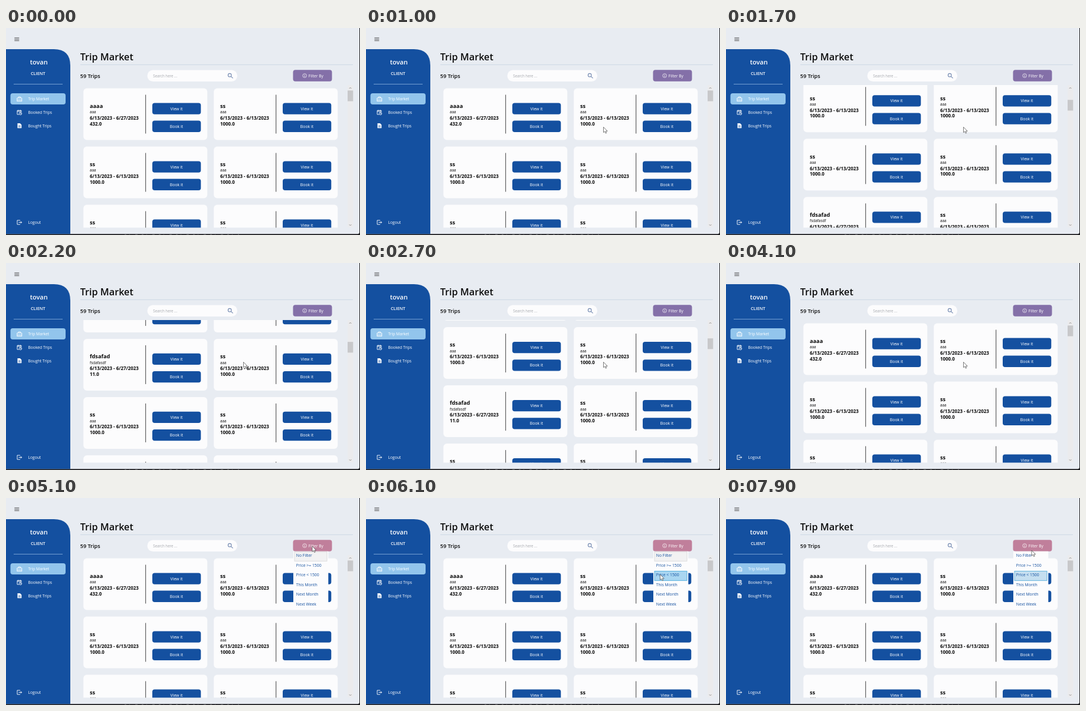
An HTML page for the animation above (8 s loop, 600 px wide and 352 px high).

```html
<!DOCTYPE html>
<html lang="en">
<head>
<meta charset="utf-8">
<title>Trip Market</title>
<style>
  html, body { margin: 0; width: 100%; height: 100%; overflow: hidden; background: #e8ecf2; }
  svg { display: block; width: 600px; height: 352px; }
  text { font: 6.7px "Open Sans", "Noto Sans", sans-serif; fill: #fff; }
  .mid { text-anchor: middle; }
  .dark text, text.dark { fill: #0a0a0a; }
  .line { fill: none; stroke: #fff; stroke-width: .9; }
  .white { fill: #fcfcfd; }
  .blue { fill: #1450a0; }
</style>
</head>
<body>
<svg viewBox="0 0 600 352">
  <defs><clipPath id="view"><rect x="120" y="97" width="450" height="242.5"/></clipPath></defs>
  <rect width="600" height="352" fill="#1d1d20"/>
  <path d="M0 0H599V347Q599 350.3 596 350.3H0Z" fill="#e8ecf2"/>
  <path d="M201 351.3H395" stroke="#77777c" stroke-width=".8" stroke-dasharray="3 5 1 9 4 7"/>
  <path d="M14.3 16.8H22.3M14.3 19.2H22.3M14.3 21.6H22.3" stroke="#444" stroke-width=".9"/>

  <g id="sidebar">
    <path class="blue" d="M0 36H81Q109 36 109 64V350.3H0Z"/>
    <text class="mid" x="55.7" y="62" style="font-size:11px;font-weight:600">tovan</text>
    <text class="mid" x="54.3" y="79.6" style="font-size:7.3px;font-weight:600">CLIENT</text>
    <path d="M13 95.5H96" stroke="#7fa9d9" stroke-width=".9"/>
    <rect x="7.5" y="111" width="93.5" height="19" rx="4" fill="#92c5ec"/>
    <text x="37.5" y="123.4">Trip Market</text>
    <text x="37.5" y="146">Booked Trips</text>
    <text x="37.5" y="168.6">Bought Trips</text>
    <text x="37.5" y="332.6">Logout</text>
    <g class="line">
      <path d="M18.8 119H26.8V124.6H18.8ZM21 119V117.2H24.6V119M18.8 122.4H26.8"/>
      <path d="M22 147H19V140.3H26V142.5M19 142H26M20.8 139.3V141M24.2 139.3V141"/>
      <circle cx="24.5" cy="145.5" r="2.2"/>
      <path d="M24.5 144.2V145.6H25.6"/>
      <path d="M24 327H19V334H24M21.5 330.5H26.5M24.8 328.6L26.7 330.5L24.8 332.4"/>
    </g>
    <path d="M19.5 162H23.7L26.3 164.6V170.3H19.5Z" fill="#fff"/>
    <path d="M21 166.3H24.8M21 168.2H24.8" stroke="#1450a0" stroke-width=".8"/>
  </g>

  <text class="dark" x="125.7" y="55" style="font-size:16.2px;font-weight:600">Trip Market</text>
  <path d="M126 62.4H588" stroke="#cbd6e5" stroke-width=".9"/>
  <text class="dark" x="125.7" y="85.2" style="font-size:9.1px;font-weight:600">59 Trips</text>
  <rect class="white" x="239.5" y="71.5" width="152.5" height="19.5" rx="9.75"/>
  <text x="249.3" y="83.8" style="font-size:6.2px;fill:#a5a8ad">Search here ...</text>
  <g class="line" style="stroke:#7288b0;stroke-width:1.1">
    <circle cx="379.2" cy="80.2" r="2.8"/><path d="M381.3 82.3L384.6 85.4"/>
  </g>
  <rect id="filter" x="486.5" y="71.3" width="66" height="19.4" rx="4"/>
  <circle class="line" cx="506.2" cy="81" r="3.3" style="stroke-width:.7"/>
  <path class="line" d="M506.2 80.5V83M506.2 78.9V79.7" style="stroke-width:.8"/>
  <text x="512.8" y="83.5">Filter By</text>

  <g clip-path="url(#view)"><g id="cards" class="dark"></g></g>

  <rect x="579" y="97" width="9.3" height="242" fill="#ebebed"/>
  <path class="line" d="M581.8 103L583.6 101.2L585.4 103M581.8 334.2L583.6 336L585.4 334.2" style="stroke:#8a8580"/>
  <rect id="thumb" x="579" width="9.3" height="18.2" fill="#c8c8ca"/>

  <g id="menu"><rect class="white" x="487" y="90.7" width="59.3" height="97.5"/></g>
  <path id="cursor" d="M0 0V9.2L2.2 7.3L3.7 10.6L5.2 9.9L3.8 6.8H6.7Z" fill="#fff" stroke="#444" stroke-width=".7"/>
</svg>
<script>
const LOOP = 8000, FRAME = 100;
const ROW_PITCH = 99, ROWS = 30, WHEEL_STEP = 26.4, TRACK = 224;
const MENU_TOP = 90.5, ITEM_HEIGHT = 16.5;
const MENU_OPENS = 5000, ITEM_CLICKED = 6300;

// [time, wheel notches] and [time, x, y]
const scrollKeys = [[1050, 0], [1700, 8], [2200, 14], [2450, 14], [2700, 11], [3200, 5], [3600, 0]];
const cursorKeys = [[200, 473, 93], [400, 467, 111], [500, 467, 111], [1000, 402.5, 168.5],
  [4100, 402.5, 168.5], [4900, 519, 82], [5200, 519, 82], [6000, 498.5, 130],
  [6700, 498.5, 130], [7900, 518, 89]];

const $ = id => document.getElementById(id);

function button(x, y, label) {
  return `<rect class="blue" x="${x}" y="${y}" width="82.3" height="19.3" rx="4"/>
    <text class="mid" x="${x + 41}" y="${y + 12.2}" style="font-size:6.9px;fill:#fff">${label}</text>`;
}

function card(x, y, [name, note, end, price]) {
  const line = (dy, size, weight, text) =>
    `<text x="10.8" y="${dy}" style="font-size:${size}px;font-weight:${weight}">${text}</text>`;
  return `<g transform="translate(${x} ${y})">
    <rect class="white" width="210" height="88" rx="6"/>
    ${line(33.4, 9.2, 700, name)}
    ${line(42.9, 6.4, 400, note)}
    ${line(53.3, 7.9, 700, `6/13/2023 - ${end}`)}
    ${line(63.2, 7.9, 700, price)}
    <path d="M105.5 11V77" stroke="#2a2a2a" stroke-width=".9"/>
    ${button(116.8, 24.9, "View it")}${button(116.8, 55.1, "Book it")}
  </g>`;
}

const usualTrip = ["ss", "aaa", "6/13/2023", "1000.0"];
const specialTrips = {
  0: ["aaaa", "aaa", "6/27/2023", "432.0"],
  8: ["fdsafad", "fsdafasdf", "6/27/2023", "11.0"]
};
$("cards").innerHTML = Array.from({ length: 20 }, (_, i) =>
  card(131.2 + i % 2 * 221, 102.5 + (i >> 1) * ROW_PITCH, specialTrips[i] || usualTrip)).join("");

const itemNames = ["No Filter", "Price &gt;= 1500", "Price &lt; 1500", "This Month", "Next Month", "Next Week"];
$("menu").innerHTML += itemNames.map((name, i) => {
  const y = MENU_TOP + i * ITEM_HEIGHT;
  return `<rect class="item" x="489" y="${y + .8}" width="55" height="16" stroke-width=".8"/>
    <text x="491.8" y="${y + 9.8}" style="font-size:6.85px;fill:#1450a0">${name}</text>`;
}).join("");
const items = [...document.querySelectorAll(".item")];

function valuesAt(keys, t) {
  const next = keys.findIndex(key => key[0] > t);
  if (next === 0) return keys[0].slice(1);
  if (next < 0) return keys[keys.length - 1].slice(1);
  const a = keys[next - 1], b = keys[next];
  const p = (t - a[0]) / (b[0] - a[0]);
  return a.slice(1).map((v, i) => v + (b[i + 1] - v) * p);
}

function itemColors(index, hovered, selected, active) {
  if (index === hovered) return ["#a9d6f1", "#3aa3da"];
  if (index === selected) return active ? ["#c5dff0", "#45a5d8"] : ["#f2f2f3", "#d6d6d8"];
  return ["none", "none"];
}

function draw(t) {
  const scroll = Math.round(valuesAt(scrollKeys, t)[0]) * WHEEL_STEP;
  $("cards").setAttribute("transform", `translate(0 ${-scroll})`);
  $("thumb").setAttribute("y", 106.3 + scroll * TRACK / (ROWS * ROW_PITCH));

  const [x, y] = valuesAt(cursorKeys, t);
  $("cursor").setAttribute("transform", `translate(${x} ${y})`);
  $("cursor").setAttribute("visibility", t < cursorKeys[0][0] ? "hidden" : "visible");

  const open = t >= MENU_OPENS, clicked = t >= ITEM_CLICKED;
  $("filter").setAttribute("fill", open ? "#c07f9b" : "#8470a8");
  $("menu").setAttribute("visibility", open ? "visible" : "hidden");
  const hovered = Math.floor((y - MENU_TOP) / ITEM_HEIGHT);
  items.forEach((item, i) => {
    const [fill, stroke] = itemColors(i, hovered, clicked ? 2 : 0, clicked);
    item.setAttribute("fill", fill);
    item.setAttribute("stroke", stroke);
  });
}

const start = performance.now();
function tick() {
  const t = (performance.now() - start) % LOOP;
  draw(Math.floor(t / FRAME) * FRAME);
  requestAnimationFrame(tick);
}
tick();
</script>
</body>
</html>
```
